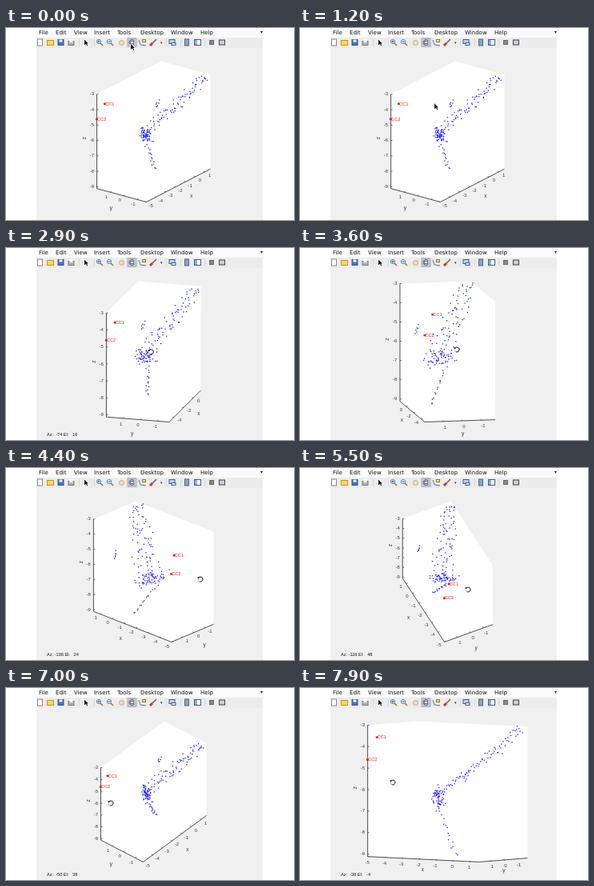
An HTML page with a canvas that plays this animation: 360x240 px, repeating every 8 s.

```html
<!DOCTYPE html>
<html lang="en">
<head>
<meta charset="utf-8">
<title>Rotating scatter plot</title>
<style>
html, body { margin: 0; width: 100%; height: 100%; overflow: hidden; background: #fff; }
canvas { display: block; width: 360px; height: 240px; }
</style>
</head>
<body>
<canvas id="stage" width="360" height="240"></canvas>
<script>
const g = document.getElementById('stage').getContext('2d');
const SANS = '"Liberation Sans", Arial, sans-serif';
const MENU = '"DejaVu Sans", "Open Sans", sans-serif';
const RAD = Math.PI / 180;
const LOOP = 8000, STEP = 100;
const INK = '#3a3a3a', RED = '#f21a0c';

// Axis limits; the three axes share one scale.
const LIM = { x: [-5, 1.55], y: [-1.7, 1.98], z: [-9.12, -3] };
const mid = ax => (LIM[ax][0] + LIM[ax][1]) / 2;
const span = ax => LIM[ax][1] - LIM[ax][0];
const CX = 184.5, CY = 129.5, HEIGHT = 176;

// Drag poses: time, azimuth, elevation, pointer x, pointer y
const KEYS = [
  [1900, -54, 22, 174, 131],
  [2300, -58, 22, 175, 132],
  [3600, -101.2, 9.5, 196, 127],
  [4400, -136, 24, 243, 139],
  [5500, -116, 48, 210, 152],
  [7000, -50, 38, 131, 144],
  [7900, -38, -3.6, 116, 118]
];

const clamp = (v, lo, hi) => Math.max(lo, Math.min(hi, v));
const mix = (a, b, k) => a + (b - a) * k;

function slope(i, c) {
  if (i <= 0 || i >= KEYS.length - 1) return 0;
  const [a, b, d] = [KEYS[i - 1], KEYS[i], KEYS[i + 1]];
  const p = (b[c] - a[c]) / (b[0] - a[0]), q = (d[c] - b[c]) / (d[0] - b[0]);
  return p * q <= 0 ? 0 : 2 * p * q / (p + q);
}

// Monotone cubic through the poses
function track(t, c) {
  let i = 0;
  while (i < KEYS.length - 2 && t >= KEYS[i + 1][0]) i++;
  const a = KEYS[i], b = KEYS[i + 1], h = b[0] - a[0];
  const s = clamp((t - a[0]) / h, 0, 1), r = 1 - s;
  return r * r * (1 + 2 * s) * a[c] + s * s * (3 - 2 * s) * b[c]
    + h * s * r * (r * slope(i, c) - s * slope(i + 1, c));
}

let seed = 71;
function rnd() {
  seed = (seed * 1664525 + 1013904223) % 4294967296;
  return seed / 4294967296;
}
const bell = () => (rnd() + rnd() + rnd()) * 2 / 3 - 1;

// A place on the tilted sheet of data: u across, w in depth, v up
const SC = Math.cos(38 * RAD), SS = Math.sin(38 * RAD);
function sheet(u, w, v) {
  const p = { x: mid('x') + SC * u + SS * w, y: mid('y') - SS * u + SC * w, z: mid('z') + v };
  for (const ax in LIM) p[ax] = clamp(p[ax], ...LIM[ax]);
  return p;
}

const dots = [];
function cloud(n, rule) {
  for (let i = 0; i < n; i++) dots.push(sheet(...rule((i + rnd()) / n)));
}
// rising branch, widening towards the top
cloud(82, k => {
  const u = mix(-0.7, 3.5, k);
  return [u, mix(0.25, 0.55, k) + bell() * mix(1.6, 0.6, k),
    0.25 + 0.76 * u + bell() * mix(0.08, 0.65, k)];
});
// dense knot
cloud(58, () => {
  const w = 0.2 + bell() * 1.6;
  return [-0.45 + bell() * 0.42, w, -0.25 - 0.25 * w + bell() * 0.65];
});
// falling tail
cloud(14, k => [mix(-0.4, 0.5, k) + bell() * 0.2, 1.2 * k, mix(-0.9, -3, k)]);
// small group at the back
cloud(6, k => [0.9 + bell() * 0.2, 2.2 + bell() * 0.15, mix(0.6, 1.1, k)]);

const marks = { CC1: sheet(-3.28, -0.8, 2.48), CC2: sheet(-3.72, -0.57, 1.45) };

function camera(az, el) {
  const c = Math.cos(az * RAD), s = Math.sin(az * RAD);
  const ce = Math.cos(el * RAD), se = Math.sin(el * RAD);
  const k = HEIGHT / (Math.abs(se) * (Math.abs(s) * span('x') + Math.abs(c) * span('y')) + ce * span('z'));
  return p => {
    const x = p.x - mid('x'), y = p.y - mid('y'), z = p.z - mid('z');
    return [CX + k * (c * x + s * y), CY - k * (se * (c * y - s * x) + ce * z)];
  };
}

function text(str, x, y, size, color, align = 'center', font = SANS) {
  g.font = size + 'px ' + font;
  g.fillStyle = color;
  g.textAlign = align;
  g.textBaseline = 'middle';
  g.fillText(str, x, y);
}

function path(pts) {
  g.beginPath();
  pts.forEach(p => g.lineTo(p[0], p[1]));
}

function line(pts, color = INK, width = 0.9) {
  path(pts);
  g.strokeStyle = color;
  g.lineWidth = width;
  g.stroke();
}

function shape(pts, color) {
  path(pts);
  g.fillStyle = color;
  g.fill();
}

function rect(x, y, w, h, color) {
  g.fillStyle = color;
  g.fillRect(x, y, w, h);
}

function ring(x, y, r, stroke, fill, from = 0, to = 7, width = 0.9) {
  g.beginPath();
  g.arc(x, y, r, from, to);
  if (fill) { g.fillStyle = fill; g.fill(); }
  g.strokeStyle = stroke;
  g.lineWidth = width;
  g.stroke();
}

function unit(a, b) {
  const x = b[0] - a[0], y = b[1] - a[1], n = Math.hypot(x, y) || 1;
  return [x / n, y / n];
}

// One lower edge; labels lean away from the edge that starts at `side`.
function floorAxis(view, from, to, side, corner, el) {
  const ax = from.x !== to.x ? 'x' : 'y';
  const a = view(from), b = view(to), d = unit(a, b);
  const ext = unit(view(side), view(corner));
  const lean = clamp(el / 40, 0, 0.5);
  const out = unit([0, 0], [mix(-d[1], ext[0], lean), mix(d[0], ext[1], lean)]);
  const gap = Math.hypot(b[0] - a[0], b[1] - a[1]) / span(ax);
  const step = gap < 9 ? 2 : 1;
  line([a, b]);
  for (let v = Math.ceil(LIM[ax][0] / step) * step; v <= LIM[ax][1]; v += step) {
    const p = view({ ...from, [ax]: v });
    line([p, [p[0] - ext[0] * 2, p[1] - ext[1] * 2]], INK, 0.7);
    text(v, p[0] + out[0] * 7.5, p[1] + out[1] * 7.5, 6, INK);
  }
  const far = 13 + 16 * lean;
  text(ax, mix(a[0], b[0], 0.5) + out[0] * far, mix(a[1], b[1], 0.5) + out[1] * far, 6.5, INK);
}

function plot(az, el) {
  const view = camera(az, el);
  const [lo, hi] = LIM.z;
  const up = c => view({ ...c, z: hi });
  const base = [];
  for (const x of LIM.x) for (const y of LIM.y) base.push({ x, y, z: lo });
  base.sort((a, b) => view(a)[0] - view(b)[0]);
  const [left, m, n, right] = base;
  const [far, near] = view(m)[1] < view(n)[1] ? [m, n] : [n, m];

  shape([view(left), view(near), view(right), up(right), up(far), up(left)], '#fff');
  floorAxis(view, left, near, right, near, el);
  floorAxis(view, near, right, left, near, el);

  const a = view(left), b = up(left);
  line([a, b]);
  for (let v = Math.ceil(lo); v <= hi; v++) {
    const p = view({ ...left, z: v });
    line([p, [p[0] + 2, p[1]]], INK, 0.7);
    text(v, p[0] - 3.5, p[1], 6, INK, 'right');
  }
  g.save();
  g.translate(a[0] - 15.5, mix(a[1], b[1], 0.5) - 4);
  g.rotate(-Math.PI / 2);
  text('z', 0, 0, 6.5, INK);
  g.restore();

  for (const d of dots) {
    const p = view(d);
    rect(p[0] - 0.65, p[1] - 0.65, 1.3, 1.3, '#1c1cff');
  }
  for (const name in marks) {
    const p = view(marks[name]);
    rect(p[0] - 1.5, p[1] - 1.2, 2.6, 2.6, RED);
    text(name, p[0] + 0.5, p[1] + 0.3, 5.6, RED, 'left');
  }
}

function panel(x, w, h, fill, edge, y = 18) {
  rect(x - w / 2, y - h / 2, w, h, edge);
  rect(x - w / 2 + 1, y - h / 2 + 1, w - 2, h - 2, fill);
}

function arrow(x, y) {
  const pts = [[0, 0], [0, 7], [2, 5.3], [3.2, 8], [4.3, 7.5], [3, 5], [5, 5], [0, 0]]
    .map(p => [x + p[0], y + p[1]]);
  line(pts, '#fff', 1.6);
  shape(pts, '#111');
}

function lens(x, plus) {
  line([[x + 1, 19], [x + 4, 22]], '#a8752d', 1.6);
  ring(x - 1, 17, 2.7, '#5a84b4', '#d9eefc');
  rect(x - 2.5, 16.6, 3, 0.8, '#245');
  if (plus) rect(x - 1.4, 15.5, 0.8, 3, '#245');
}

function toolbar() {
  rect(38, 0, 283, 12, '#fafafa');
  rect(38, 12, 283, 13, '#ececec');
  const items = { File: 41, Edit: 62, View: 85, Insert: 110, Tools: 139, Desktop: 168, Window: 206, Help: 243 };
  for (const name in items) text(name, items[name], 5.8, 7, '#111', 'left', MENU);
  text('▾', 319.5, 5.5, 6, '#222', 'center', MENU);
  for (const x of [91, 110, 200, 218, 248]) rect(x, 14, 0.7, 9, '#d0d0d0');

  panel(42.5, 7, 9, '#fff', '#888');
  panel(55.5, 9, 7, '#f7d86a', '#c89424', 18.5);
  panel(68.5, 8, 8, '#4776c4', '#34548c');
  rect(66.5, 14.5, 4, 3, '#eef');
  panel(81.5, 8, 6, '#b4b4bc', '#777', 19);
  rect(79.5, 14, 4, 4, '#fff');
  arrow(98, 14.5);
  lens(117, true);
  lens(130, false);
  ring(144.5, 18.5, 3, '#c09a74', '#f6dcc0');
  panel(157.5, 12, 11.5, '#c6c9d0', '#a6a8b0');
  ring(157.5, 18, 3.5, '#46577c', null, 0.6, 5.7);
  panel(157.5, 5, 4, '#dbe3f0', '#69789a');
  line([[166, 15], [168, 21], [175, 22]], '#3a64b0');
  panel(172.5, 5, 4, '#fbe48a', '#8b772a', 16);
  line([[183, 19], [188, 14]], '#666', 1.6);
  line([[180, 22], [183, 19]], '#c8342a', 3);
  text('▾', 194.3, 18.5, 5, '#333', 'center', MENU);
  panel(207.5, 8, 6, '#bcd4f4', '#3d5c94', 17);
  panel(209.5, 6, 4, '#e8eef8', '#3d5c94', 20);
  panel(226, 6, 9, '#78a8dc', '#666');
  panel(239.5, 9, 8, '#fff', '#3c5a93');
  rect(236, 15, 3, 6, '#8eafe0');
  panel(257, 6, 6, '#888', '#666');
  panel(270, 8, 7, '#ccd', '#444');
}

function pointer(t) {
  const x = track(t, 3), y = track(t, 4);
  if (t < 1800) {
    // from the rotate button into the axes
    const k = clamp((t - 400) / 1300, 0, 1), e = k * k * (3 - 2 * k);
    arrow(mix(156, x, e), mix(20, y, e));
    return;
  }
  ring(x, y, 3, '#888', '#fff', 0, 7, 0.6);
  ring(x, y, 3, '#222', null, -2.8, 1.9);
  rect(x - 3.5, y - 2.6, 2, 1.6, '#222');
}

function draw(t) {
  const az = track(t, 1), el = track(t, 2);
  rect(0, 0, 360, 240, '#fff');
  rect(38, 25, 283, 215, '#f0f0f0');
  plot(az, el);
  toolbar();
  // the readout shows only while dragging
  if (t >= 1900 && (t < 3400 || t >= 3700)) {
    const pad = v => String(Math.round(v)).padStart(4);
    text('Az: ' + pad(az) + ' El: ' + pad(el), 51, 233.5, 5.6, '#111', 'left');
  }
  pointer(t);
}

const start = performance.now();
function tick(now) {
  const t = Math.max(0, now - start) % LOOP;
  draw(Math.floor(t / STEP) * STEP);
  requestAnimationFrame(tick);
}
draw(0);
requestAnimationFrame(tick);
</script>
</body>
</html>
```
